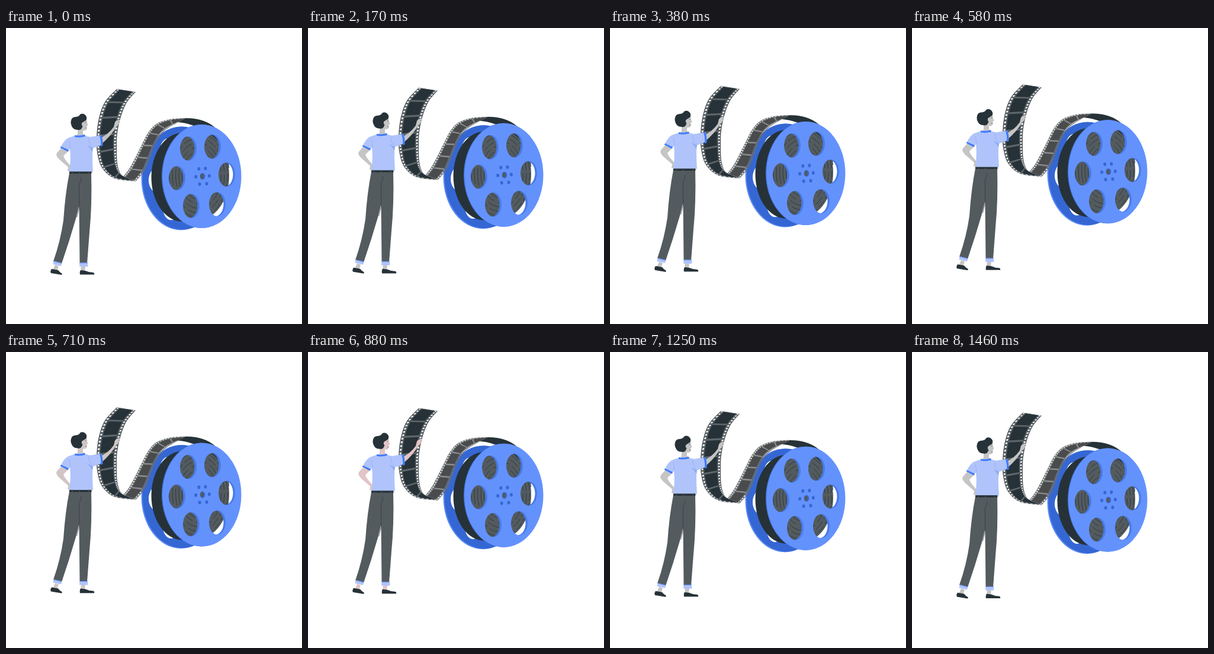
Animation of 500 by 500 pixels, one loop 1.5 s. Source, as an HTML page:

```html
<!DOCTYPE html>
<html lang="en">
<head>
<meta charset="utf-8">
<title>Film reel</title>
<style>
html, body { margin: 0; width: 100%; height: 100%; overflow: hidden; background: #fff; }
svg { display: block; width: 100vw; height: 100vh; }
</style>
</head>
<body>
<svg viewBox="0 0 500 500">
  <g id="scene">
    <g id="backReel"></g>
    <path fill="#263238" d="M290 159Q297 153 304 152.3Q334 152 353 168Q372 190 377 236L325 250L340 176Q328 168 314 164Q303 160 290 159Z"/>
    <g id="roll"></g>
    <g id="strip"></g>
    <g id="frontReel"></g>
    <g id="man">
      <g class="skin">
        <path d="M95 201L106 207L97 216Q98 220 103 226L109 233L108 243L104 241L105 235L90 222Q83 215 86 211Z"/>
        <path d="M121 168L130 168L130 179L135 182L117 184L121 179Z"/>
        <path d="M126 153L136 153L137 160L138.5 164L136.500 166L136.500 170Q135 174 130 173L122 171Z"/>
        <path d="M158 186Q172 181 182 167L184 159Q187 155 192 155L192.500 157L190 159L192 160L187 166Q176 184 160 197Z"/>
        <path d="M83 400L89 402L86 411L79 409Z"/>
        <path d="M127 401L134 401L133 412L126 412Z"/>
      </g>
      <path fill="#263238" d="M113 169Q108 162 110 156Q111 150 119 150Q124 149 125 146Q130 143 134 147Q138 151 135 156Q131 158 129 160Q131 164 128 169Q126 173 121 172Q116 172 113 169Z"/>
      <ellipse class="skin" cx="129.800" cy="162.500" rx="2" ry="3"/>
      <path d="M133.300 159.500l2.200-.3M134 169l2.300-.2" stroke="#263238" stroke-width=".6"/>
      <path fill="#263238" d="M77 407L88 409Q91 413 95 415L94 417L76 414Q74 411 77 407ZM126 409L134 410Q140 413 147 413Q150 414 149 416.600L125 416.600Q124 412 126 409Z"/>
      <path fill="#535b5f" d="M107 245H144Q145.500 300 141 345L137 398H124.500L123.500 300L118 322Q107 360 94 398L80 394Q92 360 97 325Q100 280 107 245Z"/>
      <path fill="none" stroke="#30393e" stroke-width=".7" d="M127 253Q126 262 122 266M123.500 266V304L119.500 320"/>
      <path fill="#b0c4fb" d="M80.500 393.500L94.500 397L93 402L79.500 399ZM124.500 396.500H138L138.500 403H124Z"/>
      <path fill="none" stroke="#6492fd" stroke-width="1" d="M80.500 394L94 397.500M124.500 397H138"/>
      <path fill="#b0c4fb" d="M116 182L133 182L142 184L161 181Q164 188 163 197L147 203Q145 212 147 243H107Q110 220 108 204L105 208L92 202Q99 187 107 185Z"/>
      <path fill="#407bff" d="M116 181Q125 183 133 180L134 183Q125 186 116 184ZM93 200L106 206L104.500 209L91.500 202ZM158 182L161 181Q164 188 163.500 199L160 200Q161 191 158 182Z"/>
      <path fill="#8eabf5" d="M137 198L147 203L146 209Q142 203 137 198Z"/>
      <path fill="none" stroke="#8eabf5" stroke-width=".7" d="M107 190L109 204M140 186Q139 194 146 202"/>
      <path fill="#263238" d="M107 242.500H144.500V246H107Z"/>
      <path d="M112 242v4M124 242v4M140 242v4" stroke="#535b5f"/>
    </g>
  </g>
</svg>
<script>
const byId = id => document.getElementById(id);
const fill = (d, color) => `<path fill="${color}" fill-rule="evenodd" d="${d}"/>`;
const oval = (x, y, rx, ry) =>
  `M${x - rx} ${y}a${rx} ${ry} 0 1 0 ${2 * rx} 0a${rx} ${ry} 0 1 0 ${-2 * rx} 0Z`;

// --- reels ---
const spokes = [[-23, -47], [18, -50], [42, -3], [26, 47], [-18, 50], [-42, 3]];
const holes = (x, y) => spokes.map(([dx, dy]) => oval(x + dx, y + dy, 14, 20.5)).join('');
const hub = (x, y) => spokes.map(([dx, dy]) => oval(x + dx * .27, y + dy * .265, 2.5, 3)).join('');

byId('backReel').innerHTML =
  fill(oval(295.500, 254, 67, 87.5) + holes(296, 254), '#5a8af8') +
  fill(oval(297.500, 253.500, 67, 87) + holes(297, 254), '#3567d4');

let rings = '';
for (let i = 0; i < 6; i++) {
  const k = .95 - i * .105;
  rings += `<path fill="none" stroke="#263238" stroke-width=".8" stroke-dasharray="${14 + i * 3} ${4 + i}" d="${oval(325, 249, 52 * k, 75 * k)}"/>`;
}
byId('roll').innerHTML =
  fill(oval(298, 252, 52.500, 75), '#263238') +
  fill('M298 177L325 174V324L298 327Z', '#263238') +
  fill(oval(325, 249, 52, 75), '#535b5f') + rings;

byId('frontReel').innerHTML =
  fill(oval(330, 250.500, 67, 87.500) + holes(327.500, 250.500), '#477be9') +
  fill(oval(331, 250.500, 66.500, 87.500) + holes(331, 250.500), '#6492fd') +
  fill(hub(332, 250.500) + oval(332, 250.500, 4.300, 5.500), '#3567d4') +
  fill(oval(331, 250.500, 2.800, 4.500), '#535b5f');

// --- film strip: two edges joined by matching knots ---
function along(pts, t) {
  const i = Math.min(Math.floor(t), pts.length - 2), u = t - i;
  const at = n => pts[Math.max(0, Math.min(pts.length - 1, n))];
  const [a, b, c, d] = [at(i - 1), at(i), at(i + 1), at(i + 2)];
  return [0, 1].map(k => b[k] + u / 2 * (c[k] - a[k] +
    u * (2 * a[k] - 5 * b[k] + 4 * c[k] - d[k] + u * (3 * (b[k] - c[k]) + d[k] - a[k]))));
}

function patch([left, right], t0, t1, s0, s1, n = 6) {
  const point = (t, s) => {
    const p = along(left, t), q = along(right, t);
    return p.map((v, k) => (v + (q[k] - v) * s).toFixed(2)).join(' ');
  };
  const out = [];
  for (let i = 0; i <= n; i++) out.push(point(t0 + (t1 - t0) * i / n, s0));
  for (let i = n; i >= 0; i--) out.push(point(t0 + (t1 - t0) * i / n, s1));
  return 'M' + out.join('L') + 'Z';
}

function ribbon(edges, border, cell, bar) {
  const end = edges[0].length - 1, perCell = 5;
  let base = patch(edges, 0, end, 0, 1, 60), cells = '';
  for (let i = 0; i < end * perCell; i++) {
    const t = (i + .25) / perCell, t1 = t + .5 / perCell;
    base += patch(edges, t, t1, .045, .125, 1) + patch(edges, t, t1, .875, .955, 1);
  }
  for (let i = 0; i < end; i++) cells += patch(edges, i + .06, i + .94, .18, .82);
  return fill(base, border) + fill(patch(edges, 0, end, .18, .82, 60), bar) + fill(cells, cell);
}

const inner = [
  [[198, 251], [208, 238], [219, 218], [229, 198], [240, 177], [254, 162], [277, 154], [304, 152]],
  [[219, 259], [234, 241], [243, 220], [251, 199], [261, 181], [271, 171], [282, 164], [293, 158]]
];
const outer = [
  [[187, 103], [167, 125], [157, 152], [153, 183], [154, 210], [162, 236], [183, 254], [219, 259]],
  [[219, 108], [204, 126], [194, 150], [188, 178], [187, 204], [188, 228], [192, 243], [198, 251]]
];
byId('strip').innerHTML =
  ribbon(inner, '#686e70', '#4a4b4c', '#8b8e8f') +
  ribbon(outer, '#535b5f', '#263238', '#5e666a');

// --- motion: steady rise and fall, 24 steps per second ---
const loop = 1500, steps = 36, rise = 10;
const scene = byId('scene'), skin = document.querySelectorAll('.skin');

function draw(ms) {
  const p = Math.floor((ms + 5) * steps / loop) % steps / steps;
  const up = rise * (1 - Math.abs(1 - 2 * p));
  scene.setAttribute('transform', `translate(0 ${(-up).toFixed(3)})`);
  const warm = Math.max(0, 1 - Math.abs(p - .6) / .22);
  const tone = `rgb(${Math.round(196 + 32 * warm)},197,${Math.round(196 + 2 * warm)})`;
  skin.forEach(el => el.setAttribute('fill', tone));
}

const start = performance.now();
function tick(now) {
  draw(Math.max(0, now - start) % loop);
  requestAnimationFrame(tick);
}
draw(0);
requestAnimationFrame(tick);
</script>
</body>
</html>
```
